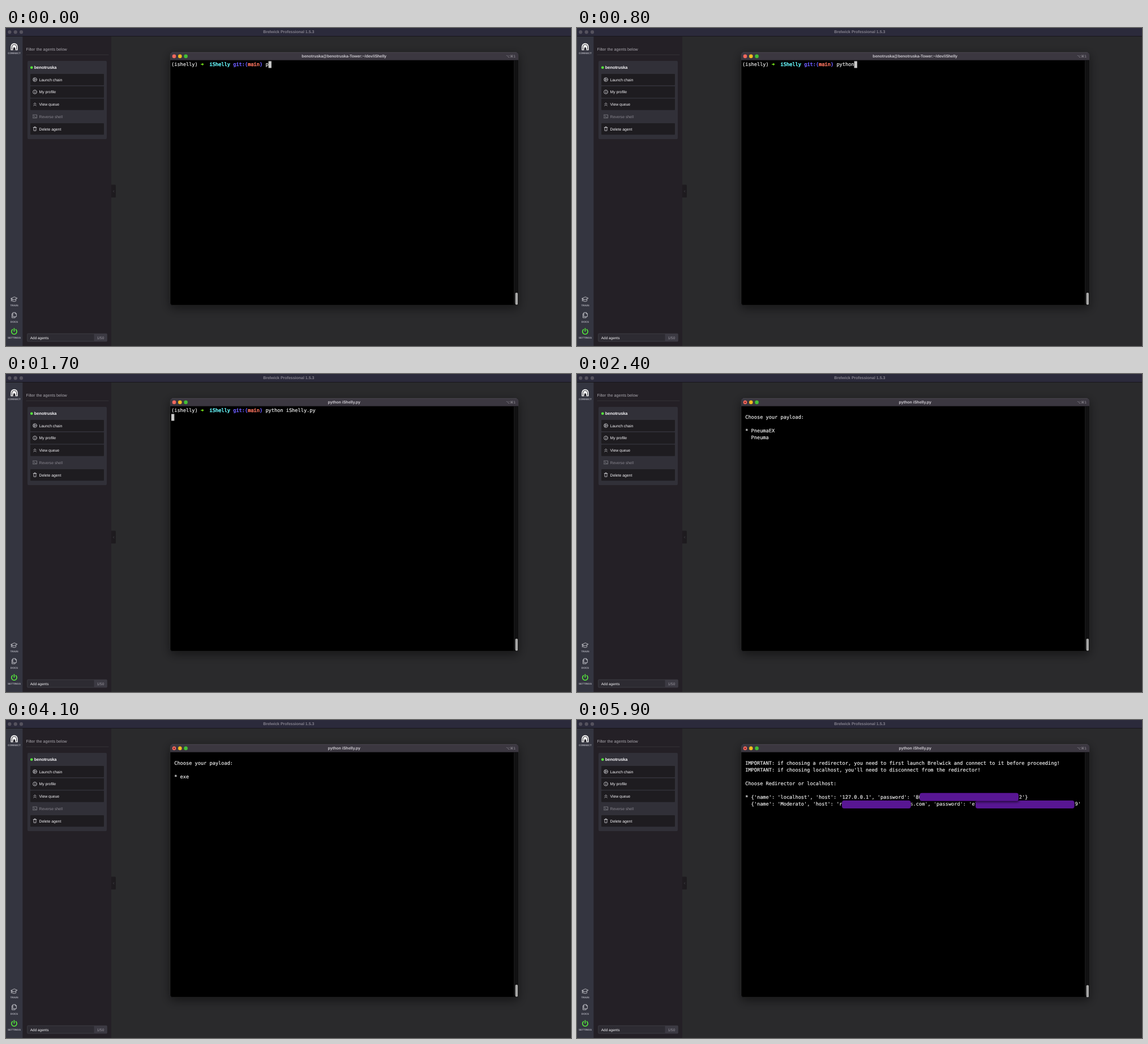
Write an HTML page that moves like this. It is 998 px wide and 561 px high and loops after 8000 ms.

```html
<!DOCTYPE html>
<html lang="en">
<head>
<meta charset="utf-8">
<title>Terminal session</title>
<style>
  html, body { margin: 0; width: 100%; height: 100%; overflow: hidden; background: #2a2a2c; }
  svg { display: block; width: 998px; height: 561px; }
  text { font: 6.85px "Liberation Sans", Arial, sans-serif; fill: #f8f7fa; white-space: pre; text-rendering: geometricPrecision; }
  .bar { font-size: 7px; font-weight: bold; text-anchor: middle; }
  .rail text { font-size: 4.6px; font-weight: bold; fill: #adadb6; text-anchor: middle; }
  .icon { fill: none; stroke: #d9d8de; stroke-width: .8; stroke-linecap: round; stroke-linejoin: round; }
  #screen { color: #f4f4f4; }
  #screen text { font: 8.64px "DejaVu Sans Mono", monospace; fill: currentColor; stroke: currentColor; stroke-width: .18; }
  #screen .bold { stroke-width: .5; }
</style>
</head>
<body>
<svg viewBox="0 0 998 561">
  <defs>
    <filter id="windowShadow" x="-10%" y="-10%" width="120%" height="125%">
      <feDropShadow dx="0" dy="5" stdDeviation="9" flood-color="#000" flood-opacity=".5"/>
    </filter>
    <filter id="maskShadow" x="-10%" y="-50%" width="120%" height="250%">
      <feDropShadow dx="1" dy="2" stdDeviation="2" flood-color="#000" flood-opacity=".65"/>
    </filter>
  </defs>

  <!-- application frame -->
  <rect width="998" height="561" fill="#2a2a2c"/>
  <rect y="14" width="29.5" height="547" fill="#343540"/>
  <rect x="29.5" y="14" width="156.5" height="547" fill="#242026"/>
  <rect width="998" height="14" fill="#2b2a3b"/>
  <rect y="14" width="998" height="1" fill="#17161c"/>
  <g fill="#55525e">
    <circle cx="6.3" cy="7.2" r="3.1"/><circle cx="16.7" cy="7.2" r="3.1"/><circle cx="27" cy="7.2" r="3.1"/>
  </g>
  <text class="bar" x="499.3" y="9.4" style="fill:#85828e">Brelwick Professional 1.5.3</text>

  <!-- left rail -->
  <g class="rail">
    <path d="M8.4 39.2V32.8a6.1 6.1 0 0 1 12.2 0v6.4z" fill="#fff"/>
    <path d="M10.5 38.2V33a4 4 0 0 1 8 0v5.2" fill="none" stroke="#24232b"/>
    <path d="M12.2 39.2l.8-4.2a1.6 1.6 0 0 1 3 0l.8 4.2z" fill="#24232b"/>
    <text x="14.5" y="46.1">CONNECT</text>
    <g class="icon">
      <path d="M9 477l5.7-2.6 5.3 2.3-5.6 2.7zM11 478.3v3.3q3.4 2 6.5 0v-3.2M9.4 477.3v4.5"/>
      <path d="M12.4 502h4l2 2v5.2h-6zM16.2 502v2.2h2.2M12.2 504h-1.7v7.2h5.6v-1.8"/>
    </g>
    <text x="14.5" y="491.4">TRAIN</text>
    <text x="14.5" y="520">DOCS</text>
    <path d="M11.5 531.9a4.7 4.7 0 1 0 5.8 0M14.4 530v5" class="icon" style="stroke:#55ef3b;stroke-width:1.6"/>
    <text x="14.5" y="548.4">SETTINGS</text>
  </g>

  <!-- agent panel -->
  <text x="35.5" y="40" style="font-size:7.2px;fill:#aaa7ae">Filter the agents below</text>
  <rect x="35.5" y="46.8" width="146" height=".7" fill="#3b383e"/>
  <rect x="38" y="58" width="140" height="138" rx="2" fill="#313038"/>
  <circle cx="45.2" cy="69.8" r="2.3" fill="#55ef3b"/>
  <text x="49.8" y="72.3" style="font-size:7.36px;font-weight:bold">benotruska</text>
  <g id="menu"></g>
  <g class="icon">
    <circle cx="51" cy="91" r="3.4"/><path d="M50 89.3l2.7 1.7-2.7 1.7z"/>
    <circle cx="51" cy="112.8" r="3.4"/><path d="M51 112.5v2M51 110.9v.1"/>
    <path d="M48.8 134.2l2.2-2.1 2.2 2.1M48.8 137.2l2.2-2.1 2.2 2.1"/>
    <g opacity=".5"><rect x="47.5" y="153.2" width="7" height="5.6"/><path d="M49 154.9l1.3 1.1-1.3 1.1M51.3 157.2h1.6"/></g>
    <path d="M48.2 175.5h5.6M50 175.3v-1h2v1M49 175.6v5.6h4v-5.6"/>
  </g>
  <rect x="37.7" y="539.3" width="140.6" height="13.6" rx="1" fill="#2d2b32" stroke="#47454e" stroke-width=".7"/>
  <rect x="155.5" y="539.6" width="22.5" height="13" fill="#3c3a43"/>
  <text x="42.8" y="548.6" style="font-size:6.45px">Add agents</text>
  <text x="167" y="548.6" text-anchor="middle" style="font-size:6.45px;fill:#9a97a1">1/50</text>
  <path d="M186 276.5h6.5a1.5 1.5 0 0 1 1.5 1.5v19.5a1.5 1.5 0 0 1-1.5 1.5H186z" fill="#1e1b1f"/>
  <path d="M190.7 286.8l-1.3 1.3 1.3 1.3" class="icon" style="stroke:#5c5961;stroke-width:.6"/>

  <!-- terminal window -->
  <rect x="290" y="42.8" width="615" height="446.4" rx="4" fill="#010101" stroke="#303033" stroke-width=".5" filter="url(#windowShadow)"/>
  <path d="M290 57V47a4 4 0 0 1 4-4h607a4 4 0 0 1 4 4v10z" fill="#3b3740"/>
  <path d="M293 43.1h609" stroke="#5d5962" stroke-width=".6"/>
  <rect x="290" y="56.5" width="615" height=".7" fill="#19171b"/>
  <rect x="897.5" y="57.2" width="7.3" height="428" fill="#111112"/>
  <rect x="897.3" y="57.2" width=".6" height="431" fill="#29292b"/>
  <circle cx="297" cy="49.9" r="3.3" fill="#f0685e"/>
  <circle cx="307.3" cy="49.9" r="3.3" fill="#f4b81f"/>
  <circle cx="317.6" cy="49.9" r="3.3" fill="#43bf35"/>
  <circle id="closeDot" cx="297" cy="50" r="1.2" fill="#751a14"/>
  <text id="title" class="bar" x="597.2" y="52.2" style="fill:#cdcad0"></text>
  <text x="900" y="51.6" text-anchor="end" style="font:6px 'DejaVu Sans',sans-serif;fill:#98959d">⌥⌘1</text>
  <rect id="thumb" x="899.6" y="467" width="4.4" height="21.2" rx="1.6" fill="#a7a7a7"/>
  <g id="screen"></g>
  <rect id="cursor" width="5.3" height="12" fill="#c9c9c9"/>
  <g id="masks" fill="#591493">
    <rect x="704" y="142" width="174.5" height="14" rx="4" filter="url(#maskShadow)"/>
    <rect x="468" y="142" width="121.6" height="14" rx="4" filter="url(#maskShadow)"/>
    <rect x="605.3" y="128.7" width="174.7" height="14" rx="4" filter="url(#maskShadow)"/>
  </g>
</svg>

<script>
const LOOP = 8000, CELL = 5.2, ROW = 12, LEFT = 292, TOP = 58.5;
const SVG = "http://www.w3.org/2000/svg";
const byId = id => document.getElementById(id);

function add(parent, tag, attrs, content = "") {
  const node = document.createElementNS(SVG, tag);
  for (const key in attrs) node.setAttribute(key, attrs[key]);
  node.textContent = content;
  parent.append(node);
}

["Launch chain", "My profile", "View queue", "Reverse shell", "Delete agent"].forEach((label, i) => {
  const mid = 91 + i * 21.8, disabled = i === 3;
  if (!disabled) add(byId("menu"), "rect", { x: 43, y: mid - 10.1, width: 130, height: 20.2, rx: 1, fill: "#1e1c20" });
  add(byId("menu"), "text", { x: 58.5, y: mid + 2.5, style: disabled ? "fill:#89868f" : "" }, label);
});

// A run is [column, row, text, color]; colored runs are bold.
const prompt = typed => [
  [0, 0, "(ishelly)"],
  [10, 0, "➜", "#7df01c"],
  [13, 0, "iShelly", "#68fbff"],
  [21, 0, "git:(", "#6c5cff"],
  [26, 0, "main", "#ff7560"],
  [30, 0, ")", "#6c5cff"],
  [32, 0, typed]
];
const choose = (...options) => [
  [1, 1, "Choose your payload:"],
  [1, 3, "*"],
  ...options.map((option, i) => [3, 3 + i, option])
];
const redirectors = [
  [1, 1, "IMPORTANT: if choosing a redirector, you need to first launch Brelwick and connect to it before proceeding!"],
  [1, 2, "IMPORTANT: if choosing localhost, you'll need to disconnect from the redirector!"],
  [1, 4, "Choose Redirector or localhost:"],
  [1, 6, "* {'name': 'localhost', 'host': '127.0.0.1', 'password': '86"],
  [94, 6, "2'}"],
  [3, 7, "{'name': 'Moderato', 'host': 'r"],
  [57, 7, "s.com', 'password': 'e7"],
  [113, 7, "9'"]
];

const typing = [
  [0, "p"], [100, "py"], [500, "pyt"], [600, "pyth"], [700, "pytho"], [800, "python"],
  [900, "python i"], [1000, "python is"], [1100, "python ish"], [1300, "python iShelly.py "]
];
const scenes = [
  ...typing.map(([at, typed]) => ({ at, runs: prompt(typed), cursor: [32 + typed.length, 0] })),
  { at: 1700, runs: prompt("python iShelly.py"), cursor: [0, 1] },
  { at: 2100, runs: choose("PneumaEX", "Pneuma") },
  { at: 4000, runs: choose("exe") },
  { at: 5600, runs: redirectors }
];

const show = (id, visible) => byId(id).setAttribute("visibility", visible ? "visible" : "hidden");
let current;

function drawScene({ runs, cursor }) {
  const screen = byId("screen");
  screen.replaceChildren();
  for (const [col, row, content, color] of runs) {
    add(screen, "text", {
      x: LEFT + col * CELL, y: TOP + row * ROW + 8.9,
      class: color ? "bold" : "", style: color ? `color:${color}` : ""
    }, content);
  }
  show("cursor", cursor);
  if (cursor) {
    byId("cursor").setAttribute("x", LEFT + cursor[0] * CELL);
    byId("cursor").setAttribute("y", TOP + cursor[1] * ROW);
  }
}

function render(now) {
  const t = now % LOOP;
  const scene = scenes.findLast(s => s.at <= t) || scenes[0];
  if (scene !== current) drawScene(current = scene);
  byId("title").textContent = t < 1700 ? "benotruska@benotruska-Tower:~/dev/iShelly" : "python iShelly.py";
  byId("thumb").setAttribute("y", t < 5600 ? 467 : 467.8);
  show("closeDot", t >= 2400);
  show("masks", t >= 5500);
}

const start = performance.now();
function tick() {
  render(performance.now() - start);
  requestAnimationFrame(tick);
}
tick();
</script>
</body>
</html>
```
